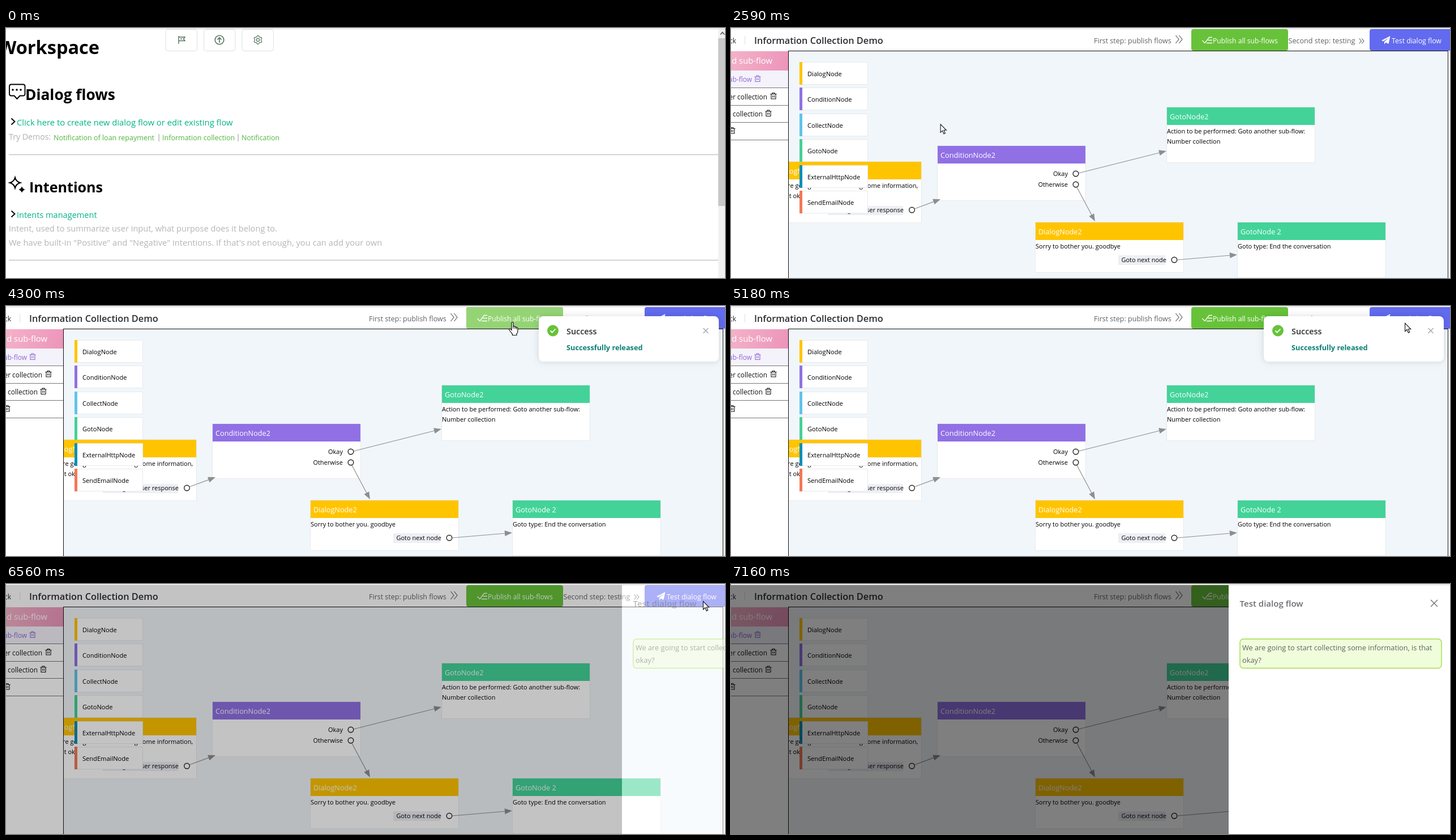
Recreate the animation shown at these times as an HTML page with a canvas. Size 1270x441 px, loop 8000 ms.

```html
<!DOCTYPE html>
<html lang="en">
<head>
<meta charset="utf-8">
<title>Dialog flow walkthrough</title>
<style>
html, body { margin: 0; width: 1270px; height: 441px; overflow: hidden; background: #fff; }
canvas { display: block; }
</style>
</head>
<body>
<canvas id="stage" width="1270" height="441"></canvas>
<script>
const ctx = document.getElementById('stage').getContext('2d');
const LOOP = 8000, STEP = 68.2;
const YELLOW = '#ffc400', PURPLE = '#9070e4', GREEN = '#43d399', GREY = '#606266';

const ramp = (t, start, length) => Math.min(1, Math.max(0, (t - start) / length));
const smooth = p => p * p * (3 - 2 * p);
const easeOut = p => 1 - (1 - p) ** 3;

function text(s, x, y, size, color = '#000', weight = 400, align = 'left') {
  ctx.font = `${weight} ${size}px "Open Sans", "Noto Sans", sans-serif`;
  ctx.fillStyle = color;
  ctx.textAlign = align;
  ctx.fillText(s, x, y);
}
function rect(x, y, w, h, color) {
  ctx.fillStyle = color;
  ctx.fillRect(x, y, w, h);
}
function paint(fill, stroke, width = 1) {
  if (fill) { ctx.fillStyle = fill; ctx.fill(); }
  if (stroke) { ctx.strokeStyle = stroke; ctx.lineWidth = width; ctx.stroke(); }
}
function round(x, y, w, h, r, fill, stroke, width) {
  ctx.beginPath();
  ctx.roundRect(x, y, w, h, r);
  paint(fill, stroke, width);
}
function circle(x, y, r, fill, stroke, width) {
  ctx.beginPath();
  ctx.arc(x, y, r, 0, Math.PI * 2);
  paint(fill, stroke, width);
}
function shape(x, y, d, fill, stroke, width) {
  ctx.save();
  ctx.translate(x, y);
  const path = new Path2D(d);
  if (fill) { ctx.fillStyle = fill; ctx.fill(path); }
  if (stroke) { ctx.strokeStyle = stroke; ctx.lineWidth = width || 1; ctx.stroke(path); }
  ctx.restore();
}
function faded(alpha, draw) {
  ctx.save();
  ctx.globalAlpha = alpha;
  draw();
  ctx.restore();
}
const cross = (x, y, r, color) =>
  shape(x, y, `M${-r} ${-r}L${r} ${r}M${r} ${-r}L${-r} ${r}`, null, color, 1.2);

// ---- workspace page ----

function link(s, x, y, size, color, box, hover) {
  if (hover) faded(hover, () => {
    rect(box[0], box[1], box[2], 23, '#caf0e5');
    rect(box[0], box[1] + 21.5, box[2], 1.5, '#5cc06a');
  });
  faded(1 - 0.45 * hover, () => text(s, x, y, size, color));
}

function gear(x, y) {
  ctx.beginPath();
  for (let i = 0; i <= 48; i++) {
    const a = i / 48 * Math.PI * 2, r = 6.5 + Math.cos(a * 6);
    ctx.lineTo(x + r * Math.sin(a), y + r * Math.cos(a));
  }
  paint(null, '#55705e', 1.2);
  circle(x, y, 2.6, null, '#55705e', 1.2);
}

function workspace(t) {
  const hoverCreate = ramp(t, 700, 180) - ramp(t, 1000, 200);
  const hoverDemo = ramp(t, 1050, 250);

  text('Workspace', 165, 46, 32.5, '#000', 700, 'right');
  for (const x of [282, 349.5, 417]) round(x, 2.5, 55.5, 38, 4, '#fff', '#dcdfe6');
  shape(304, 14, 'M1 0V14M1 2H12L9.5 5.2L12 8.5H1M4 5.2H7', null, '#55705e', 1.4);
  circle(377, 21, 7.8, null, '#55705e', 1.6);
  shape(377, 21, 'M0 5V-4M-3.5 -0.5L0 -4L3.5 -0.5', null, '#55705e', 1.6);
  gear(445, 21);

  shape(5, 98, 'M4 1.5H25Q28.5 1.5 28.5 5V18Q28.5 21.5 25 21.5H19.5L14.5 27L9.5 21.5H4Q1 21.5 1 18V5Q1 1.5 4 1.5Z', null, '#000', 1.9);
  for (const x of [12, 19, 26]) circle(x, 109, 1.8, '#000');
  text('Dialog flows', 34, 127, 26.3, '#000', 700);
  text('Intentions', 41, 290, 25.1, '#000', 700);
  shape(16, 273, 'M0 -9Q2 -2 9 0Q2 2 0 9Q-2 2 -9 0Q-2 -2 0 -9Z', null, '#000', 2.2);
  shape(28, 285, 'M0 -5.5Q1.5 -1.5 5.5 0Q1.5 1.5 0 5.5Q-1.5 1.5 -5.5 0Q-1.5 -1.5 0 -5.5Z', '#000');
  for (const y of [165, 328]) shape(9, y, 'M0.5 -5.5L6.5 0L0.5 5.5', null, '#000', 1.9);

  link('Click here to create new dialog flow or edit existing flow', 19, 172, 14.83, '#00b386', [19, 155, 382], hoverCreate);
  text('Try Demos:', 5, 197, 14.2, '#b0b0b0');
  link('Notification of loan repayment', 84, 198, 12.5, '#4fb53a', [], 0);
  link('Information collection', 276, 198, 12.5, '#4fb53a', [276, 181, 129], hoverDemo);
  link('Notification', 416, 198, 12.4, '#4fb53a', [], 0);
  for (const x of [270, 410]) text('|', x, 197, 13, '#8a8a8a', 400, 'center');
  text('Intents management', 19, 335, 14.55, '#00b386');
  text('Intent, used to summarize user input, what purpose does it belong to.', 5, 359, 14.58, '#b5b5b5');
  text('We have built-in "Positive" and "Negative" intentions. If that\'s not enough, you can add your own', 5, 384, 14.76, '#b5b5b5');
  for (const y of [223, 409]) rect(5, y, 1253, 1, '#b0b0b0');

  rect(1258, 2, 12, 439, '#f1f1f1');
  rect(1258, 18, 12, 296, '#c8c8c8');
  shape(1265.5, 9, 'M-3.5 2.5L0 -1.5L3.5 2.5', null, '#555', 1.6);
}

// ---- flow editor page ----

function node(x, y, h, title, color, lines) {
  round(x - .5, y - .5, 262, h + 1, 0, '#fff', '#e6eaee');
  rect(x, y, 261, 31, color);
  text(title, x + 5, y + 21, 12.7, '#fff');
  lines.forEach((s, i) => text(s, x, y + 46 + 18 * i, 11));
}
function port(s, right, y, circleX) {
  text(s, right, y + 4, 11, '#000', 400, 'right');
  circle(circleX, y, 4.8, '#fff', '#222', 1.4);
}
function arrow(x1, y1, x2, y2) {
  const a = Math.atan2(y2 - y1, x2 - x1);
  ctx.beginPath();
  ctx.moveTo(x1, y1);
  ctx.lineTo(x2 - 6 * Math.cos(a), y2 - 6 * Math.sin(a));
  paint(null, '#8e8e8e', 1.2);
  ctx.save();
  ctx.translate(x2, y2);
  ctx.rotate(a);
  shape(0, 0, 'M0 0L-13 -5V5Z', '#8e8e8e');
  ctx.restore();
}
const trash = (x, y, color) =>
  shape(x, y, 'M-5.5 -3.5H5.5M-2 -3.5V-5.5H2V-3.5M-4 -3.5V5H4V-3.5M-1.3 -1V2.5M1.3 -1V2.5', null, color, 1.1);

function sidebar() {
  const pink = ctx.createLinearGradient(0, 41, 101, 75);
  pink.addColorStop(0, '#f4b2c8');
  pink.addColorStop(1, '#ec94ba');
  rect(0, 41, 101, 34, pink);
  text('Add sub-flow', 73, 63, 14.8, '#fff', 400, 'right');
  rect(0, 75, 101, 30, '#f4f2fa');
  const rows = [['Main sub-flow', 37, 47], ['Number collection', 64, 75], ['Name collection', 56, 66], ['End', -8, 2]];
  rows.forEach(([s, right, iconX], i) => {
    const color = i ? '#111' : '#9166d6', y = 90 + 30.5 * i;
    text(s, right, y + 5, 11.9, color, 400, 'right');
    trash(iconX, y - .5, color);
    rect(0, Math.round(105 + 30.6 * i), 101, 1, '#777');
  });
}

function palette() {
  const items = [['DialogNode', YELLOW], ['ConditionNode', '#8f71e3'], ['CollectNode', '#60c4ea'],
    ['GotoNode', '#43d197'], ['ExternalHttpNode', '#0f8fb8'], ['SendEmailNode', '#f27858']];
  items.forEach(([s, color], i) => {
    const y = Math.round(60.5 + 45.5 * i);
    round(121.5, y - .5, 120, 39, 0, '#fff', '#e6eaee');
    rect(121, y - 1, 5, 40, color);
    text(s, 135, y + 24, 11.1);
  });
}

function header(t) {
  const hover = ramp(t, 3200, 250) - ramp(t, 4600, 250);
  text('Back', 9, 27, 12, '#222', 400, 'right');
  rect(24, 14, 1, 15, '#dcdfe6');
  text('Information Collection Demo', 41, 28, 16.3, '#2b2d31', 600);
  text('First step: publish flows', 641, 27, 12.52, GREY);
  shape(785, 20, 'M0.5 -7L6 0L0.5 7M6.5 -7L12 0L6.5 7', null, GREY, 1.2);
  round(813, 2, 171, 38, 4, '#67c23a');
  faded(hover, () => round(813, 2, 171, 38, 4, '#95d475'));
  shape(832, 21, 'M0.5 1L5 5.5L13 -5M13 -4.5H18M10.5 0.5H18M8 5.5H18', null, '#fff', 1.3);
  text('Publish all sub-flows', 851, 27, 12.13, '#fff');
  text('Second step: testing', 984.5, 27, 12.6, GREY);
  shape(1109, 23, 'M0.5 -4.5L4.5 0L0.5 4.5M5 -4.5L9 0L5 4.5', null, GREY, 1.1);
  round(1128, 2, 150, 38, 4, '#626aef');
  shape(1149, 14, 'M15.5 0L12.5 14L7.5 11.5L5 15V10.3L13 3L3.3 9.6L0 8Z', '#fff');
  text('Test dialog flow', 1167, 27, 12.25, '#fff');
}

function editor(t) {
  header(t);
  sidebar();
  rect(102, 41, 1164, 400, '#f1f6fa');
  ctx.save();
  ctx.beginPath();
  ctx.rect(102, 41, 1164, 400);
  ctx.clip();
  node(75, 236, 107, 'DialogNode', YELLOW, ['We are going to start collecting some information,', 'is that okay?']);
  rect(171, 314, 133, 16, '#eeeff5');
  port('Waiting for user response', 305, 321, 319.5);
  node(365, 208, 96, 'ConditionNode2', PURPLE, []);
  port('Okay', 595, 257, 609);
  port('Otherwise', 595, 276, 609);
  node(770, 140, 97, 'GotoNode2', GREEN, ['Action to be performed: Goto another sub-flow:', 'Number collection']);
  node(538, 343, 88, 'DialogNode2', YELLOW, ['Sorry to bother you. goodbye']);
  rect(684, 401, 83, 17, '#eeeff5');
  port('Goto next node', 769, 409, 783);
  node(895, 343, 97, 'GotoNode 2', GREEN, ['Goto type: End the conversation']);
  arrow(324, 319, 370, 302);
  arrow(614, 256, 769, 217);
  arrow(611, 281, 643, 341);
  arrow(788, 409, 894, 400);
  palette();
  ctx.restore();
  rect(101, 40, 1166, 1, '#111');
  rect(101, 40, 1, 401, '#111');
  rect(1266, 40, 1, 401, '#111');
}

function toast(t) {
  const enter = easeOut(ramp(t, 3930, 320)), leave = ramp(t, 5570, 300);
  if (!enter || leave === 1) return;
  ctx.save();
  ctx.globalAlpha = 1 - leave;
  ctx.translate(335 * (1 - enter), 0);
  ctx.save();
  ctx.shadowColor = 'rgba(0,0,0,.14)';
  ctx.shadowBlur = 12;
  round(941, 18, 318, 80, 8, '#fff');
  ctx.restore();
  circle(966, 43.5, 10, '#67c23a');
  shape(966, 43.5, 'M-4.5 0L-1.3 3.3L4.5 -3', null, '#fff', 1.8);
  text('Success', 990, 50, 14.4, '#303133', 600);
  text('Successfully released', 990, 78, 12.75, '#0c8074', 700);
  cross(1236, 43.5, 4.5, '#a0a3a8');
  ctx.restore();
}

function drawer(t) {
  const p = easeOut(ramp(t, 6485, 330));
  if (!p) return;
  const shift = Math.round(391 * (1 - p));
  ctx.save();
  ctx.globalAlpha = p;
  rect(0, 2, 879 + shift, 439, 'rgba(0,0,0,.5)');
  ctx.translate(shift, 0);
  rect(879, 2, 391, 439, '#fff');
  text('Test dialog flow', 898.5, 40, 15.05, '#6c6f73', 600);
  cross(1242, 34, 6, '#666');
  round(899, 97, 356, 51.5, 6, '#f0fdda', '#a3dc4c', 1.4);
  text('We are going to start collecting some information, is that', 903, 117, 12.75, GREY);
  text('okay?', 903, 139, 12.75, GREY);
  ctx.restore();
}

// ---- pointer ----

const route = [[68, 1051, 394], [760, 350, 172], [900, 322, 170], [1130, 312, 190], [1420, 317, 183],
  [2440, 317, 183], [3250, 889, 34], [3460, 894, 28], [4440, 894, 28], [5390, 1231, 30],
  [6750, 1231, 30], [6890, 1097, 78], [7100, 1030, 460]];
const clicks = [[2040, 2250], [3660, 3870], [6200, 6350]];

function pointer(t) {
  if (t < 68 || t > 7100) return;
  const i = route.findIndex(k => k[0] >= t), b = route[i], a = route[Math.max(0, i - 1)];
  const p = smooth(ramp(t, a[0], b[0] - a[0] || 1));
  const x = a[1] + (b[1] - a[1]) * p, y = a[2] + (b[2] - a[2]) * p;
  if (clicks.some(([from, to]) => t >= from && t < to)) circle(x - 1, y + .5, 11.5, 'rgba(250,220,0,.78)');
  const hand = (t > 730 && t < 2450) || (t > 3100 && x < 941 && t < 5000);
  if (hand) {
    shape(x - 6, y, 'M5 2Q5 0.5 6.5 0.5Q8 0.5 8 2V8Q10.5 7 11 9Q13 8.2 13.5 10Q16 9.5 16 12V16Q16 19 14 21V23.5H6.5V21.5Q4 18.5 1 14.5Q0 12.5 1.5 12Q3 12 5 14.5Z', '#fff', '#111', 1.2);
    shape(x - 6, y, 'M8 8V12M11 9V12.5M13.5 10V13', null, '#111', 1);
  } else {
    shape(x, y, 'M.5 .5V15L3.9 11.8L6.3 17.5L8.7 16.5L6.3 11H10.7Z', '#fff', '#111', 1.1);
  }
}

function frame(now) {
  const t = Math.floor(now % LOOP / STEP + .2) * STEP;
  rect(0, 0, 1270, 441, '#fff');
  // 2450 ms falls on the 36th step
  if (t < 36 * STEP) workspace(t);
  else {
    editor(t);
    toast(t);
  }
  drawer(t);
  pointer(t);
  rect(0, 1, 1270, 1, '#d4d4d4');
  requestAnimationFrame(frame);
}
requestAnimationFrame(frame);
</script>
</body>
</html>
```
